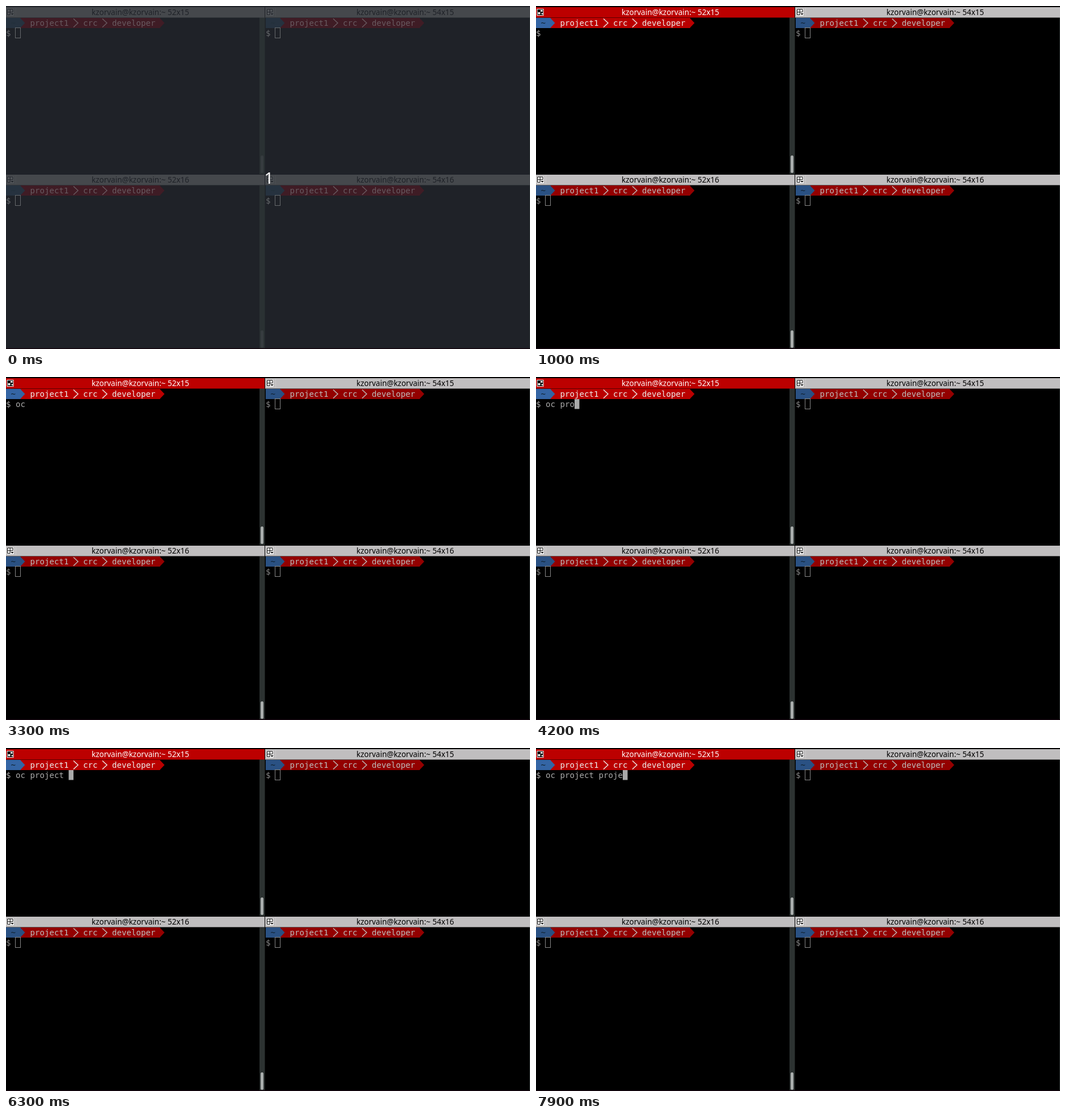
An HTML page that plays this animation: 924x606 px, repeating every 8000 ms.

```html
<!DOCTYPE html>
<html lang="en">
<head>
<meta charset="utf-8">
<title>Split terminal</title>
<style>
  html, body { margin: 0; width: 100%; height: 100%; overflow: hidden; background: #000; }
  svg { display: block; width: 924px; height: 606px; }
  text { white-space: pre; }
  .mono { font: 14.12px "DejaVu Sans Mono", monospace; }
  .title { font: 13.5px "Noto Sans", sans-serif; text-anchor: middle; }
  .count { font: 28px "Noto Sans", sans-serif; }
</style>
</head>
<body>
<svg id="stage" viewBox="0 0 924 606" xmlns="http://www.w3.org/2000/svg"></svg>
<script>
const LOOP = 8000;
const CELL = 8.5;
const ROW = 18;
const USER = "kzorvain";

const ACTIVE = {
  back: "#000", bar: "#bc0000", title: "#fff", blue: "#3465a4", red: "#ba0000",
  tilde: "#10202c", label: "#eeeeec", text: "#aaa", light: "#fff", dark: "#000"
};
const IDLE = {
  back: "#000", bar: "#c0bebf", title: "#000", blue: "#2a5183", red: "#930000",
  tilde: "#10202c", label: "#bebebd", text: "#888", light: "#fff", dark: "#000",
  divider: "#cccaca", track: "#2c3231"
};
const DIMMED = {
  back: "#1f2228", bar: "#45484c", title: "#1f2228", blue: "#26323f", red: "#3f1c25",
  tilde: "#22303a", label: "#685a60", text: "#66696c", light: "#53565a", dark: "#1f2228",
  divider: "#4a4d51", track: "#2a3133"
};

// [start time, typed text, cursor visible]
const typing = [
  [0, "", true], [1000, "", false], [1400, "", true], [2000, "", false], [2400, "", true],
  [2500, "o", true], [2700, "oc ", true], [3300, "oc ", false], [3800, "oc p", true],
  [4200, "oc pro", true], [5000, "oc proj", true], [5300, "oc proje", true],
  [5600, "oc projec", true], [6000, "oc project", true], [6300, "oc project ", true],
  [6600, "oc project ", false], [6800, "oc project ", true], [7000, "oc project p", true],
  [7100, "oc project pro", true], [7700, "oc project pro", false], [7900, "oc project proje", true]
];

const stage = document.getElementById("stage");

function add(parent, tag, attrs, content = "") {
  const node = document.createElementNS("http://www.w3.org/2000/svg", tag);
  for (const name in attrs) node.setAttribute(name, attrs[name]);
  node.textContent = content;
  return parent.appendChild(node);
}

const rect = (parent, x, y, width, height, fill) => add(parent, "rect", { x, y, width, height, fill });
const path = (parent, d, attrs) => add(parent, "path", { d, ...attrs });
const mono = (parent, col, y, fill, content) =>
  add(parent, "text", { class: "mono", x: col * CELL, y, fill }, content);

function drawIcon(parent, { light, dark }, active) {
  rect(parent, 1.5, 5, 12, 12, light);
  if (active) {
    rect(parent, 2.5, 6, 10, 10, dark);
    rect(parent, 3.5, 11, 4, 3.5, light);
    path(parent, "M8 7h3.5v3h-3.5z M9 12.5h4l-2 3z", { fill: light });
  } else {
    path(parent, "M2.5 6h9.5v4.8h-9.5z M7.2 6v9.5 M2.5 10.8v4.7h4.7", { fill: "none", stroke: dark });
    path(parent, "M8.5 13h5l-2.5 3z", { fill: dark });
  }
}

function drawPrompt(parent, colors) {
  const arrow = (x, fill) => path(parent, `M${x} 21l8.5 9l-8.5 9z`, { fill });
  const chevron = col => path(parent, `M${col * CELL} 22.5l8 7.5l-8 7.5`,
    { fill: "none", stroke: colors.label, "stroke-width": 1.4 });
  rect(parent, 25, 21, 246.5, ROW, colors.red);
  arrow(271, colors.red);
  rect(parent, 0, 21, 25.5, ROW, colors.blue);
  arrow(25, colors.blue);
  mono(parent, 1, 35, colors.tilde, "~");
  [[5, "project1"], [16, "crc"], [22, "developer"]].forEach(([col, word]) => mono(parent, col, 35, colors.label, word));
  [14, 20].forEach(chevron);
}

function drawPane(parent, x, y, barLeft, center, size, colors) {
  const active = colors === ACTIVE;
  const pane = add(parent, "g", { transform: `translate(${x} ${y})` });
  rect(pane, barLeft, 2, x ? 467 : 456, 18.5, colors.bar);
  if (!active) rect(pane, 17, 3, 1, 16, colors.divider);
  drawIcon(pane, colors, active);
  add(pane, "text", { class: "title", x: center, y: 16, fill: colors.title }, `${USER}@${USER}:~ ${size}`);
  drawPrompt(pane, colors);
  mono(pane, 0, 53, colors.text, "$");
  if (!active) add(pane, "rect", { x: 16.5, y: 38.5, width: 9, height: 18, fill: "none", stroke: colors.text });
  return pane;
}

function drawScene(first, others) {
  const scene = add(stage, "g", {});
  rect(scene, 0, 0, 924, 606, others.back);
  rect(scene, 447, 20, 9.5, 277, others.track);
  rect(scene, 447, 317, 9.5, 288, others.track);
  rect(scene, 923, 20, 1, 585, others.track);
  const thumbs = [264, 573].map(y => add(scene, "rect", { x: 449, y, width: 5, height: 31, rx: 2.5 }));
  const main = drawPane(scene, 0, 0, 0, 237, "52x15", first);
  drawPane(scene, 458, 0, -1, 246, "54x15", others);
  drawPane(scene, 0, 296, 0, 237, "52x16", others);
  drawPane(scene, 458, 296, -1, 246, "54x16", others);
  return { scene, main, thumbs };
}

const waiting = drawScene(DIMMED, DIMMED);
waiting.thumbs.forEach(thumb => thumb.setAttribute("fill", "#363c3f"));
add(waiting.scene, "text", { class: "count", x: 455.5, y: 314, fill: "#fff" }, "1");

const terminal = drawScene(ACTIVE, IDLE);
const command = mono(terminal.main, 2, 53, ACTIVE.text, "");
const cursor = rect(terminal.main, 0, 39, CELL, 17.5, ACTIVE.text);

rect(stage, 0, 604.5, 924, 1.5, "#14060f");

const show = (node, visible) => node.setAttribute("display", visible ? "inline" : "none");

function render(time) {
  const [, typed, cursorOn] = typing.findLast(([start]) => time >= start);
  show(waiting.scene, time < 200);
  show(terminal.scene, time >= 200);
  command.textContent = typed;
  cursor.setAttribute("x", (2 + typed.length) * CELL);
  show(cursor, cursorOn);
  terminal.thumbs.forEach(thumb => thumb.setAttribute("fill", time < 300 ? "#5c605f" : "#aaaead"));
}

const origin = performance.now();
function tick() {
  render((performance.now() - origin) % LOOP);
  requestAnimationFrame(tick);
}
tick();
</script>
</body>
</html>
```
